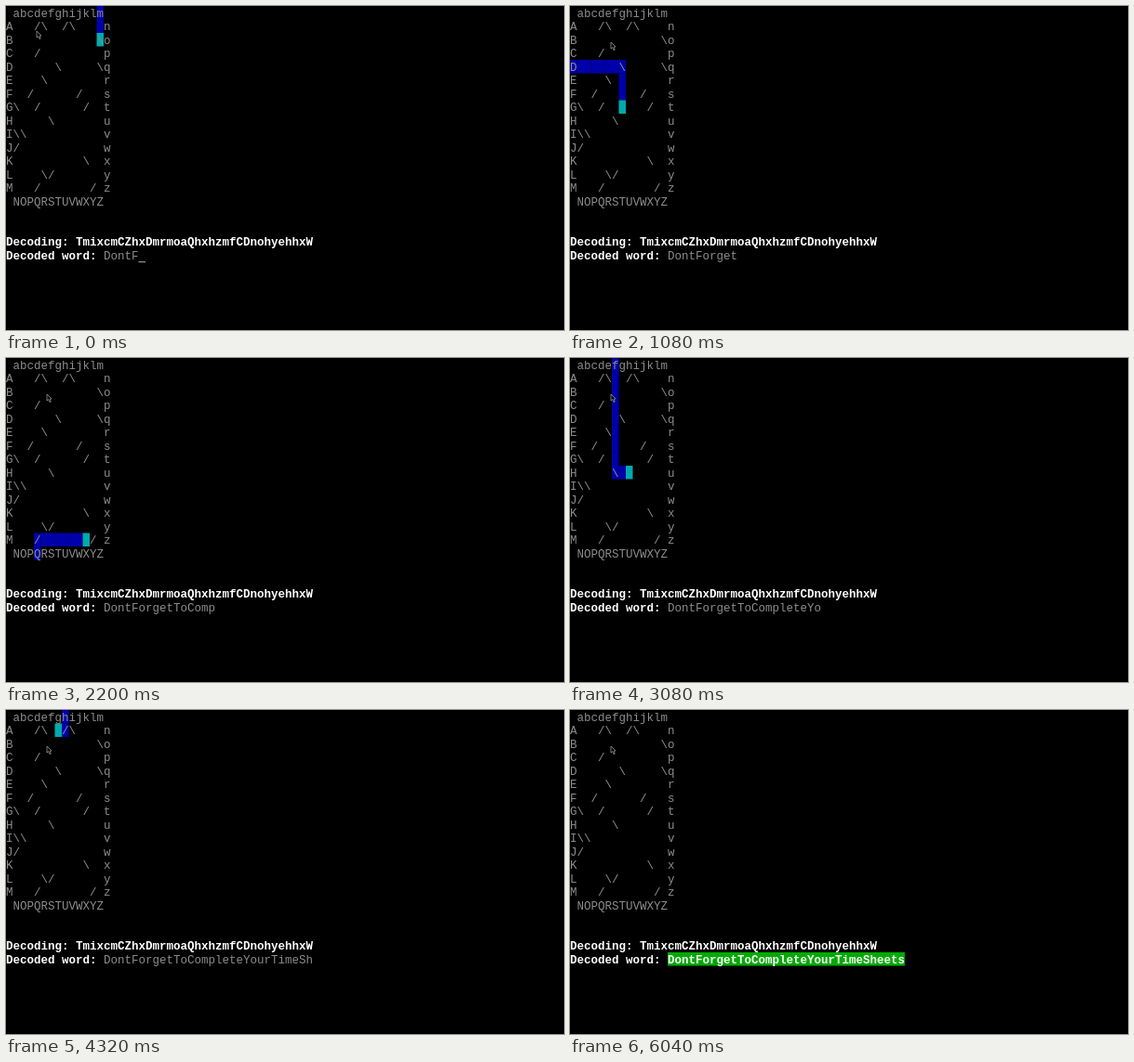
Write an HTML page with a canvas that moves like this. It is 600 by 349 pixels and loops after 6.56 s.

```html
<!DOCTYPE html>
<html>
<head>
<meta charset="utf-8">
<title>Mirror cipher</title>
<style>
  html, body { margin: 0; height: 100%; overflow: hidden; background: #000; }
  canvas { display: block; }
</style>
</head>
<body>
<canvas width="600" height="349"></canvas>
<script>
const ctx = document.querySelector('canvas').getContext('2d');
const CELL_W = 7.5, CELL_H = 14.5;
const LOOP = 6560, TICK = 40, HIGHLIGHT_AT = 6000;
const GREY = '#8c8c8c', BLUE = '#0000aa', CYAN = '#00aaaa', GREEN = '#00aa00';

const grid = String.raw` abcdefghijklm
A   /\  /\    n
B            \o
C   /         p
D      \     \q
E    \        r
F  /      /   s
G\  /      /  t
H     \       u
I\\           v
J/            w
K          \  x
L    \/       y
M   /       / z
 NOPQRSTUVWXYZ`.split('\n');

const cipher = 'TmixcmCZhxDmrmoaQhxhzmfCDnohyehhxW';
const alreadyDecoded = 5;

// Follow the beam from a border letter to the letter where it leaves.
function trace(letter) {
  let y = grid.findIndex(row => row.includes(letter));
  let x = grid[y].indexOf(letter);
  let dx = x === 0 ? 1 : x === 14 ? -1 : 0;
  let dy = y === 0 ? 1 : y === 14 ? -1 : 0;
  const cells = [[x, y]];
  for (;;) {
    x += dx;
    y += dy;
    cells.push([x, y]);
    const mark = grid[y][x];
    if (mark === '/') [dx, dy] = [-dy, -dx];
    else if (mark === '\\') [dx, dy] = [dy, dx];
    else if (mark !== ' ') return { cells, result: mark };
  }
}

const beams = [...cipher].map(trace);
const plain = beams.map(beam => beam.result).join('');

// Beam progress: [time in ms, cells travelled]
const pace = [[0, 2], [1080, 73], [2200, 147], [3080, 203], [3840, 252], [4320, 285], [4840, 319]];

function stepAt(t) {
  const i = pace.findIndex(([time]) => time > t);
  if (i < 0) return Infinity;
  const [t0, s0] = pace[i - 1], [t1, s1] = pace[i];
  return Math.round(s0 + (s1 - s0) * (t - t0) / (t1 - t0));
}

function fillCells(x, y, count, color) {
  ctx.fillStyle = color;
  ctx.fillRect(x * CELL_W, y * CELL_H, count * CELL_W, CELL_H);
}

function print(text, x, y, color = GREY, weight = 'normal') {
  ctx.font = `${weight} 12.5px "Liberation Mono", "Courier New", monospace`;
  ctx.fillStyle = color;
  [...text].forEach((ch, i) => ctx.fillText(ch, (x + i) * CELL_W, y * CELL_H + 11.5));
}

function drawPointer(t) {
  const p = Math.min(1, t / 240);
  ctx.save();
  ctx.translate(33 + 11 * p, 27 + 12 * p);
  ctx.beginPath();
  [[0, 0], [0, 7], [1.6, 5.6], [3, 8.6], [4.2, 8], [3, 5.2], [5, 5]].forEach(([x, y]) => ctx.lineTo(x, y));
  ctx.closePath();
  ctx.fillStyle = '#000';
  ctx.fill();
  ctx.strokeStyle = '#999';
  ctx.lineWidth = 0.8;
  ctx.stroke();
  ctx.restore();
}

function draw(t) {
  ctx.fillStyle = '#000';
  ctx.fillRect(0, 0, 600, 349);

  let step = stepAt(t), done = alreadyDecoded;
  while (done < beams.length && step >= beams[done].cells.length) {
    step -= beams[done++].cells.length;
  }
  const running = done < beams.length;
  if (running) {
    beams[done].cells.slice(0, step + 1).forEach(([x, y], i) => fillCells(x, y, 1, i === step ? CYAN : BLUE));
  }
  grid.forEach((row, y) => print(row, 0, y));

  print('Decoding: ' + cipher, 0, 17, '#fff', 'bold');
  print('Decoded word:', 0, 18, '#fff', 'bold');
  if (t >= HIGHLIGHT_AT) {
    fillCells(14, 18, plain.length, GREEN);
    print(plain, 14, 18, '#fff', 'bold');
  } else {
    print(plain.slice(0, done), 14, 18);
  }

  const cursorOn = (t + 970) % 1000 >= 500;
  if (running && cursorOn) {
    ctx.fillStyle = GREY;
    ctx.fillRect((14 + done) * CELL_W, 275, CELL_W, 1.3);
  }
  drawPointer(t);
}

const start = performance.now();
function frame() {
  const t = (performance.now() - start) % LOOP;
  draw(Math.floor(t / TICK) * TICK);
  requestAnimationFrame(frame);
}
frame();
</script>
</body>
</html>
```
